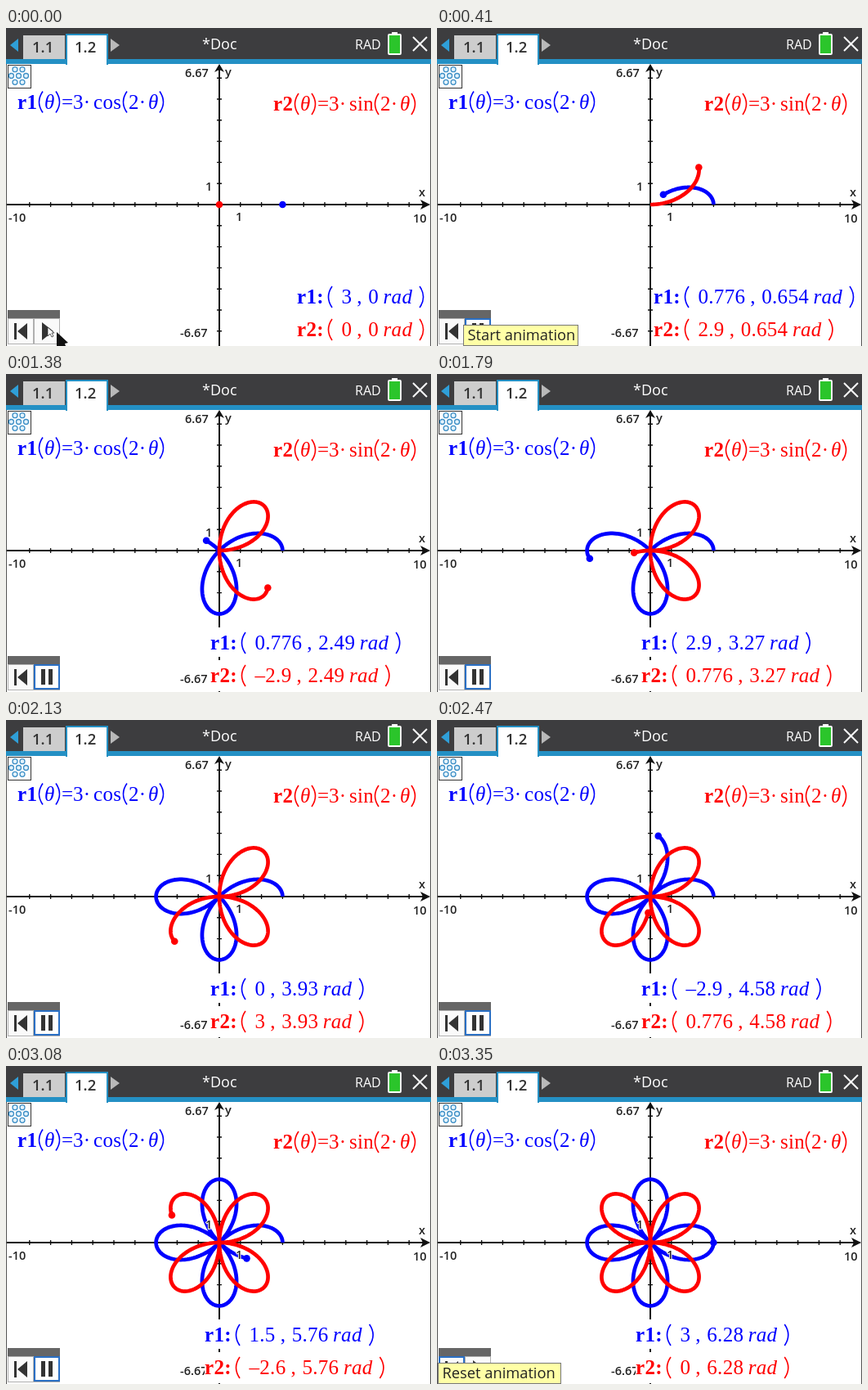
Write an HTML page that moves like this. It is 520 px wide and 389 px high and loops after 8.35 s.

```html
<!DOCTYPE html>
<html lang="en">
<head>
<meta charset="utf-8">
<title>Polar roses</title>
<style>
html, body { margin: 0; width: 100%; height: 100%; overflow: hidden; background: #fff; }
svg { display: block; width: 100vw; height: 100vh; }
text { font-family: "Open Sans", "Noto Sans", sans-serif; white-space: pre; }
.math text { font: 25px "Liberation Serif", "Noto Serif", serif; letter-spacing: .3px; }
.math .b { font-weight: bold; }
.math .i { font-style: italic; }
.axis text { font-size: 14.5px; font-weight: 600; fill: #222; }
.tab { font-size: 18.5px; font-weight: 600; fill: #333; }
.curve { fill: none; stroke-width: 4.7; stroke-linejoin: round; }
</style>
</head>
<body>
<svg id="stage" viewBox="0 0 520 389" preserveAspectRatio="none"></svg>
<script>
const LOOP = 8350, STEPS = 48, OX = 261, OY = 216, UNIT = 25.8;
const BLUE = '#0000ff', RED = '#ff0000', DARK = '#3d3d3f', TRIM = '#2490c4';
const stage = document.getElementById('stage');

function add(tag, attrs, parent = stage, text) {
  const el = document.createElementNS('http://www.w3.org/2000/svg', tag);
  for (const key in attrs) el.setAttribute(key, attrs[key]);
  if (text !== undefined) el.textContent = text;
  return parent.appendChild(el);
}
const group = (attrs = {}, parent = stage) => add('g', attrs, parent);
const rect = (x, y, width, height, fill, parent, more) =>
  add('rect', { x, y, width, height, fill, ...more }, parent);
const path = (d, attrs, parent) => add('path', { d, ...attrs }, parent);
const label = (x, y, text, attrs, parent) => add('text', { x, y, ...attrs }, parent, text);
const show = (el, on) => el.setAttribute('display', on ? 'inline' : 'none');

// Tall thin parenthesis; dir 1 opens, -1 closes
function paren(x, y, dir, parent) {
  const a = dir > 0 ? x + 6 : x, b = dir > 0 ? x - 3 : x + 9;
  return path(`M${a} ${y - 21}Q${b} ${y - 8} ${a} ${y + 5}`,
    { fill: 'none', stroke: 'currentColor', 'stroke-width': 1.6 }, parent);
}

function drawAxes() {
  const line = { stroke: '#111', 'stroke-width': 2, fill: 'none' };
  path(`M${OX} 46V389M1 ${OY}H518`, line);
  let d = '';
  for (let i = -9; i <= 9; i++) {
    if (!i) continue;
    d += `M${OX + i * UNIT} ${OY - 3}v6`;
    if (Math.abs(i) < 7) d += `M${OX - 3} ${OY - i * UNIT}h6`;
  }
  path(d, { ...line, 'stroke-width': 1.4 });
  path(`M${OX} 44l6 10l-6 -3l-6 3zM519 ${OY}l-12 -6l3 6l-3 6z`, { fill: '#111' });
}

function drawAxisLabels() {
  const g = group({ class: 'axis', stroke: '#fff', 'stroke-width': 2, 'paint-order': 'stroke' });
  label(219, 60, '6.67', {}, g);
  label(268, 59, 'y', {}, g);
  label(244, 199, '1', {}, g);
  label(505, 206, 'x', {}, g);
  label(3, 237, '-10', {}, g);
  label(281, 236, '1', {}, g);
  label(498, 238, '10', {}, g);
  label(213, 378, '-6.67', {}, g);
}

function drawFormula(x, y, name, fn, color) {
  const g = group({ class: 'math', fill: color, color });
  label(x, y, name, { class: 'b' }, g);
  paren(x + 25, y, 1, g);
  label(x + 33, y, 'θ', { class: 'i' }, g);
  paren(x + 47, y, -1, g);
  label(x + 54, y, '=', {}, g);
  label(x + 68, y, '3·', {}, g);
  label(x + 93, y, fn, {}, g);
  const k = fn === 'cos' ? 136 : 131;
  paren(x + k - 8, y, 1, g);
  label(x + k, y, '2·', {}, g);
  label(x + k + 24, y, 'θ', { class: 'i' }, g);
  paren(x + k + 38, y, -1, g);
}

function drawHeader() {
  rect(0, 0, 520, 39, DARK);
  rect(0, 38, 520, 6, TRIM);
  rect(21, 9, 51, 29, '#cdcdcd');
  path('M74 44V8h50v36z', { fill: '#fff', stroke: TRIM, 'stroke-width': 2 });
  rect(75, 36, 48, 9, '#fff');
  path('M15 13v16l-10 -8z', { fill: '#2f9fd8' });
  path('M128 13v16l11 -8z', { fill: '#b9b9b9' });
  label(32, 30, '1.1', { class: 'tab' });
  label(84, 30, '1.2', { class: 'tab' });
  label(240, 26, '*Doc', { 'font-size': 18, fill: '#fff' });
  label(427, 26, 'RAD', { 'font-size': 16, fill: '#fff' });
  rect(472, 5, 7, 4, '#fff');
  rect(468, 8, 15, 24, '#2bc52b', stage, { stroke: '#fff', 'stroke-width': 1.8, rx: 1 });
  path('M498 11L515 28M515 11L498 28', { stroke: '#fff', 'stroke-width': 2 });
  path('M.5 44V389M519.5 44V389', { stroke: '#555', 'stroke-width': 1 });
}

function drawIcon() {
  rect(2.5, 45.5, 28, 28, '#fff', stage, { stroke: '#333' });
  const g = group({ fill: '#e4f3fc', stroke: '#3d8fc6', 'stroke-width': 1.3 });
  for (let i = 0; i < 6; i++) {
    const a = i * Math.PI / 3;
    add('circle', { cx: 15.5 + 9 * Math.cos(a), cy: 58.5 + 9 * Math.sin(a), r: 3 }, g);
  }
  add('circle', { cx: 15.5, cy: 58.5, r: 3 }, g);
}

function tooltip(x, width, text) {
  const g = group();
  rect(x, 363.5, width, 25, '#ffffa6', g, { stroke: '#777' });
  label(x + 5, 382, text, { 'font-size': 18.3, fill: '#222' }, g);
  return g;
}

function makeControls() {
  rect(2, 345, 64, 10, '#666');
  rect(2.5, 355.5, 31, 31, '#fafafa', stage, { stroke: '#b0b0b0' });
  rect(34.5, 355.5, 31, 31, '#fafafa', stage, { stroke: '#b0b0b0' });
  path('M10 361h3v20h-3zM26 361v20l-12 -10z', { fill: '#333' });
  const play = path('M44 360v22l14 -11z', { fill: '#333' });
  const pause = group();
  rect(35, 356, 30, 29, '#fff', pause, { stroke: '#2a6fc4', 'stroke-width': 2 });
  path('M43 361h5v19h-5zM52 361h5v19h-5z', { fill: '#333' }, pause);
  const focus = rect(3, 356, 30, 29, 'none', stage, { stroke: '#2a6fc4', 'stroke-width': 2 });
  const cursor = group();
  path('M51 366v11l3 -3l2 4l2 -1l-2 -4h3z', { fill: '#fff', stroke: '#333', 'stroke-width': .8 }, cursor);
  path('M62 372v17h11l-1 -3l4 -1z', { fill: '#111' }, cursor);
  return {
    play, pause, focus, cursor,
    start: tooltip(32.5, 140, 'Start animation'),
    reset: tooltip(1.5, 150, 'Reset animation')
  };
}

function makeCurve(fn, color) {
  const line = path('', { class: 'curve', stroke: color });
  const dot = add('circle', { r: 4.3, fill: color });
  const at = a => [OX + UNIT * fn(a) * Math.cos(a), OY - UNIT * fn(a) * Math.sin(a)];
  return end => {
    const n = Math.max(1, Math.ceil(end / .02));
    const pts = Array.from({ length: n + 1 }, (_, i) => at(end * i / n).map(v => v.toFixed(2)).join(' '));
    line.setAttribute('d', end ? 'M' + pts.join('L') : '');
    const [cx, cy] = at(end);
    dot.setAttribute('cx', cx);
    dot.setAttribute('cy', cy);
  };
}

// Advance of a number in the 25px serif face
const advance = s => [...s].reduce((w, c) => w + (c === '.' ? 6.55 : 12.8), 0);
const format = v => String(+(Math.abs(v) < 1e-9 ? 0 : v).toPrecision(3)).replace('-', '–');

function makeReadout(y, name, fn, color) {
  const g = group({ class: 'math', fill: color, color });
  const back = rect(0, y - 27, 10, y < 350 ? 36 : 38, '#fff', g);
  label(0, y, name + ':', { class: 'b' }, g);
  paren(37, y, 1, g);
  const value = label(54.5, y, '', {}, g);
  const comma = label(0, y, ',', {}, g);
  const angle = label(0, y, '', {}, g);
  const unit = label(0, y, 'rad', { class: 'i' }, g);
  const close = group({}, g);
  paren(0, y, -1, close);
  return (x, a) => {
    const v = format(fn(a)), s = format(a);
    const mid = 54.5 + advance(v), right = mid + 20 + advance(s);
    value.textContent = v;
    angle.textContent = s;
    comma.setAttribute('x', mid + 6);
    angle.setAttribute('x', mid + 20);
    unit.setAttribute('x', right + 5.5);
    close.setAttribute('transform', `translate(${right + 50} 0)`);
    back.setAttribute('width', right + 58);
    g.setAttribute('transform', `translate(${x} 0)`);
  };
}

const r1 = a => 3 * Math.cos(2 * a), r2 = a => 3 * Math.sin(2 * a);

rect(0, 0, 520, 389, '#fff');
drawAxes();
const curves = [makeCurve(r1, BLUE), makeCurve(r2, RED)];
drawAxisLabels();
drawFormula(14, 98.5, 'r1', 'cos', BLUE);
drawFormula(327, 101, 'r2', 'sin', RED);
const readouts = [makeReadout(337, 'r1', r1, BLUE), makeReadout(377, 'r2', r2, RED)];
drawHeader();
drawIcon();
const ui = makeControls();

// Pace of the stepping: [time, step]
const pace = [[60, 0], [970, 13], [1790, 25], [2470, 35], [2600, 37], [2740, 39], [3350, STEPS]];
const starts = Array.from({ length: STEPS + 1 }, (_, k) => {
  const i = Math.max(1, pace.findIndex(p => p[1] >= k));
  const [t0, k0] = pace[i - 1], [t1, k1] = pace[i];
  return Math.round((t0 + (t1 - t0) * (k - k0) / (k1 - k0)) / 10) * 10;
});

// The readout moves left when a wider number needs room
const readoutX = k => k < 1 ? 356 : k < 7 ? 265 : k < 36 ? 250 : 243;

function render(t) {
  let k = 0;
  while (k < STEPS && t >= starts[k + 1]) k++;
  const a = k * Math.PI / 24, done = k === STEPS, running = t >= 60 && !done;
  curves.forEach(draw => draw(a));
  readouts.forEach(draw => draw(readoutX(k), a));
  show(ui.play, !running);
  show(ui.pause, running);
  show(ui.focus, done);
  show(ui.cursor, t < 60);
  show(ui.start, t >= 60 && t < 870);
  show(ui.reset, done);
}

const begin = performance.now();
function tick() {
  render((performance.now() - begin) % LOOP);
  requestAnimationFrame(tick);
}
tick();
</script>
</body>
</html>
```
